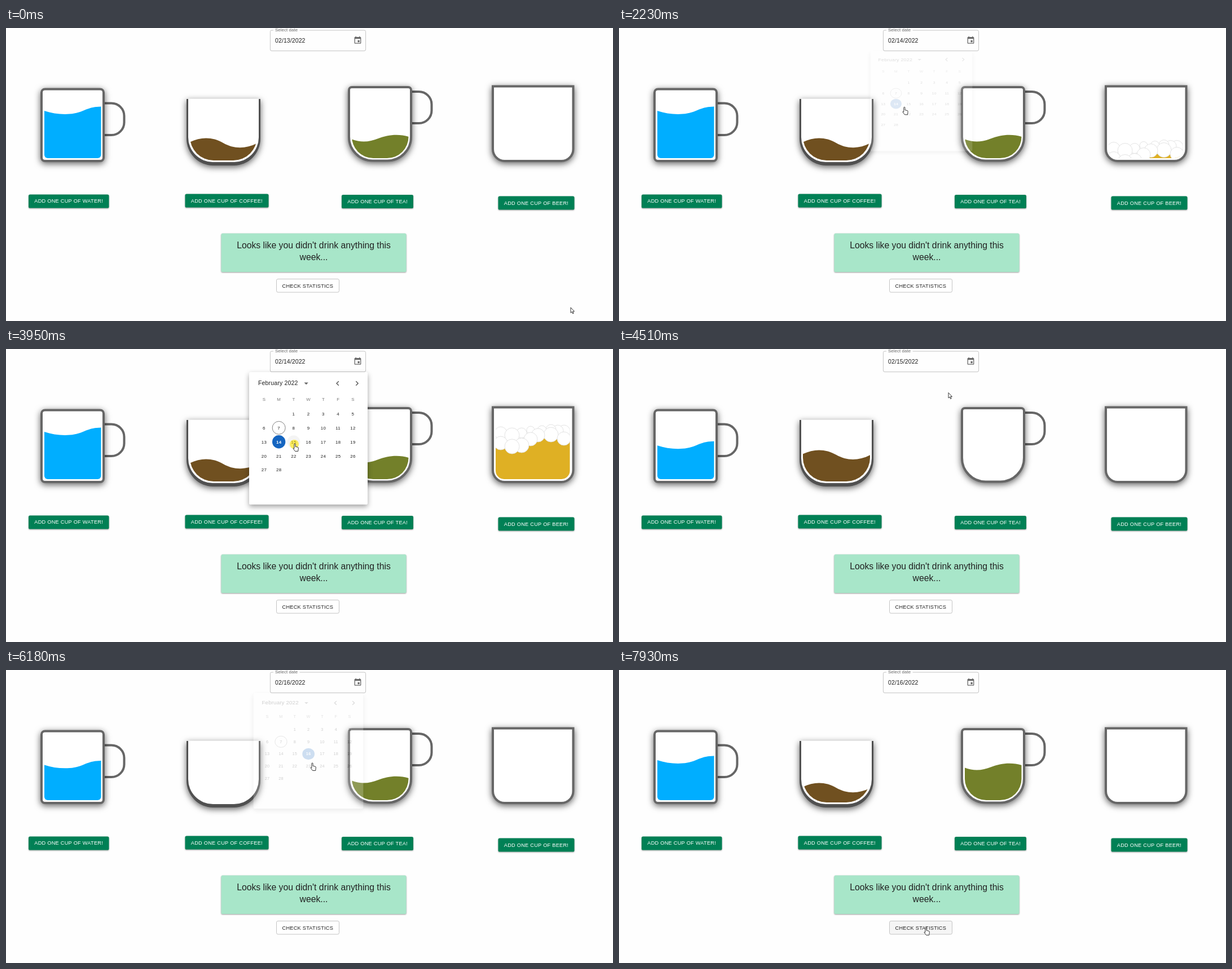
An HTML page for the animation above (7.99 s loop, 1076 px wide and 520 px high).

```html
<!DOCTYPE html>
<html lang="en">
<head>
<meta charset="utf-8">
<title>Drink tracker</title>
<style>
html, body { margin: 0; width: 100%; height: 100%; overflow: hidden; background: #fefefe; }
svg { display: block; width: 1076px; height: 520px; }
text { font: 9.2px "Liberation Sans", Arial, sans-serif; fill: #212121; }
.button rect { fill: #008055; filter: drop-shadow(0 1.5px 1.2px rgba(0,0,0,.38)); }
.button text { fill: #fff; letter-spacing: .263px; }
.body { filter: drop-shadow(0 3px 6px rgba(0,0,0,.62)); }
.glass { fill: #fff; stroke: #666; stroke-width: 4; }
.handle { fill: none; stroke: #666; stroke-width: 4; }
.foam circle { fill: #fff; stroke: #dcdcdc; stroke-width: .8; }
.panel { filter: drop-shadow(0 1px 1.2px rgba(0,0,0,.4)); }
.day { font-size: 7.9px; letter-spacing: .2px; text-anchor: middle; }
.sheet { filter: drop-shadow(0 4px 5px rgba(0,0,0,.36)); }
.cursor { fill: #fff; stroke: #222; stroke-width: .9; stroke-linejoin: round; }
</style>
</head>
<body>
<svg viewBox="0 0 1076 520">
  <defs>
    <clipPath id="waterClip"><path d="M68 112H168.5V225a6 6 0 0 1-6 6H74a6 6 0 0 1-6-6Z"/></clipPath>
    <clipPath id="coffeeClip"><path d="M326 126H445V193A42 42 0 0 1 403 235H368A42 42 0 0 1 326 193Z"/></clipPath>
    <clipPath id="teaClip"><path d="M613 110H713.5V192A38 38 0 0 1 675 231H651A38 38 0 0 1 613 192Z"/></clipPath>
    <clipPath id="beerClip"><path d="M868 108H999.5V216a15 15 0 0 1-15 15H883a15 15 0 0 1-15-15Z"/></clipPath>
  </defs>

  <!-- date field -->
  <path id="field" fill="none" d="M474 4H471a2.6 2.6 0 0 0-2.6 2.6V38a2.6 2.6 0 0 0 2.6 2.6H635a2.6 2.6 0 0 0 2.6-2.6V6.600a2.600 2.600 0 0 0-2.600-2.600H520.500"/>
  <text x="477" y="6" style="font-size:7.9px;letter-spacing:.07px;fill:#666">Select date</text>
  <text id="date" x="477" y="25.800" style="font-size:10.5px;letter-spacing:.1px"></text>
  <circle id="iconHover" cx="623.500" cy="22" r="12.800" fill="#000"/>
  <path fill="#686868" transform="translate(615.600 14) scale(.656)" d="M17 12h-5v5h5zM16 1v2H8V1H6v2H5c-1.100 0-2 .900-2 2v14c0 1.100.900 2 2 2h14c1.100 0 2-.900 2-2V5c0-1.100-.900-2-2-2h-1V1zm3 18H5V8h14z"/>

  <!-- cups -->
  <path class="handle" d="M174 133.500H187A22.500 22.500 0 0 1 209.500 156V167.500A22.500 22.500 0 0 1 187 190H174"/>
  <rect class="glass body" x="63" y="108.500" width="110" height="127.500" rx="6"/>
  <g clip-path="url(#waterClip)"><path id="water" fill="#00aeff" d="M68 147C90 154.500 118 155 135 147.500S158 140 169 139.500V300H68Z"/></g>

  <path class="body" fill="#505050" d="M320 126V196A47 48 0 0 0 367 244H404A47 48 0 0 0 451 196V126Z"/>
  <path fill="#fff" d="M323 125.500V194A44 44 0 0 0 367 238H404A44 44 0 0 0 448 194V125.500Z"/>
  <g clip-path="url(#coffeeClip)"><path id="coffee" fill="#705020" d="M325 203C345 193 366 193 385 204S425 215 446 204V300H325Z"/></g>

  <path class="handle" d="M719 113H732A22.500 22.500 0 0 1 754.500 135.500V146.500A22.500 22.500 0 0 1 732 169H719"/>
  <path class="glass body" d="M613 105H713a5 5 0 0 1 5 5V193A42 42 0 0 1 676 235.500H650A42 42 0 0 1 608 193V110a5 5 0 0 1 5-5Z"/>
  <g clip-path="url(#teaClip)"><path id="tea" fill="#73802a" d="M613 197.500C630 204 645 202 660 196S695 187 714 193V300H613Z"/></g>

  <path class="glass body" d="M863 103.500H1005.500V215a21 21 0 0 1-21 21H884a21 21 0 0 1-21-21Z"/>
  <g clip-path="url(#beerClip)"><g id="beer">
    <path fill="#dfb024" d="M867 187C890 192 915 192 930 182S970 174 1000 180V320H867Z"/>
    <g class="foam" id="foam"></g>
  </g></g>

  <g id="buttons"></g>

  <!-- message and statistics -->
  <rect class="panel" x="381.500" y="364.500" width="328" height="68.500" rx="2.600" fill="#a8e6c9"/>
  <g text-anchor="middle">
    <text x="545.500" y="390.500" style="font-size:15.75px">Looks like you didn't drink anything this</text>
    <text x="545.500" y="411.500" style="font-size:15.75px">week...</text>
  </g>
  <rect id="stats" x="479.500" y="445.500" width="111" height="23.500" rx="2.600" stroke="#c4c4c4"/>
  <text x="489.500" y="460.600" style="letter-spacing:.263px">CHECK STATISTICS</text>

  <!-- calendar -->
  <g id="popup">
    <rect class="sheet" x="431" y="41" width="210" height="235" rx="2.600" fill="#fff"/>
    <text x="447" y="64.300" style="font-size:10.5px;letter-spacing:.17px">February 2022</text>
    <path d="M528.500 59.500H535.800L532.150 63.200Z" fill="#666"/>
    <path d="M589.800 57.200L586 61L589.800 64.800M620.300 57.200L624.100 61L620.300 64.800" fill="none" stroke="#555" stroke-width="1.400"/>
    <circle id="dayHover" r="11.500" fill="#000" fill-opacity=".045"/>
    <circle id="today" r="11.500" fill="none" stroke="#757575" stroke-width=".9"/>
    <circle id="picked" r="11.700" fill="#1565c0"/>
    <g id="days"></g>
  </g>

  <circle id="press" r="8" fill="#ffe600" fill-opacity=".6"/>
  <path class="cursor" id="arrow" d="M0 0V9.500L2.200 7.500 3.700 11 5.200 10.300 3.700 7H6.500Z"/>
  <path class="cursor" id="hand" d="M-1.100 8.500V1.100a1.100 1.100 0 0 1 2.200 0V5.300l4 .900q1.400.400 1.200 1.900l-.600 5.400H.500L-3 8.600q0-1.400 1.900-.1z"/>
</svg>
<script>
const LOOP = 7990;
const $ = id => document.getElementById(id);
const clamp = x => Math.min(1, Math.max(0, x));

function add(parent, tag, attrs, label) {
  const node = document.createElementNS('http://www.w3.org/2000/svg', tag);
  for (const name in attrs) node.setAttribute(name, attrs[name]);
  if (label !== undefined) node.textContent = label;
  return parent.appendChild(node);
}
const set = (id, attrs) => { for (const name in attrs) $(id).setAttribute(name, attrs[name]); };
const show = (id, on) => { $(id).style.display = on ? '' : 'none'; };
const move = (id, x, y) => set(id, { transform: `translate(${x} ${y})` });

// cubic-bezier(.4, 0, .2, 1)
function standard(x) {
  x = clamp(x);
  let low = 0, high = 1;
  for (let i = 0; i < 20; i++) {
    const s = (low + high) / 2, r = 1 - s;
    if (1.2 * r * r * s + .6 * r * s * s + s * s * s < x) low = s; else high = s;
  }
  return low * low * (3 - 2 * low);
}
const easeOut = x => 1 - (1 - clamp(x)) ** 3;

[['WATER', 40, 295.5, 142.5, 310.3], ['COFFEE', 317.5, 294.5, 148, 309.5],
 ['TEA', 595, 296, 127, 310.8], ['BEER', 872.5, 298.5, 135, 313.6]].forEach(([drink, x, y, width, base]) => {
  const g = add($('buttons'), 'g', { class: 'button' });
  add(g, 'rect', { x, y, width, height: 24, rx: 2.6 });
  add(g, 'text', { x: x + 10.3, y: base }, `ADD ONE CUP OF ${drink}!`);
});

[[989, 162, 11], [978, 161, 10], [966, 159, 9], [950, 160, 8], [930, 160, 7], [914, 165, 9],
 [877, 165, 11], [966, 168, 13], [989, 175, 12], [943, 169, 12], [897, 169, 13],
 [930, 176, 12], [877, 183, 12], [914, 187, 13], [897, 189, 13]]
  .forEach(([cx, cy, r]) => add($('foam'), 'circle', { cx, cy, r }));

const column = i => 457.4 + 26.25 * i;
const dayPlace = d => ({ cx: column((d + 1) % 7), cy: 115 + 24.9 * Math.floor((d + 1) / 7) });
[...'SMTWTFS'].forEach((letter, i) =>
  add($('days'), 'text', { x: column(i), y: 91.6, class: 'day', style: 'fill:#777' }, letter));
const dayLabels = Array.from({ length: 28 }, (_, i) => {
  const p = dayPlace(i + 1);
  return add($('days'), 'text', { x: p.cx, y: p.cy + 2.8, class: 'day' }, i + 1);
});
set('today', dayPlace(7));

const TO_14 = 2000, TO_15 = 4000, TO_16 = 5930;
const popups = [[950, 2060], [3190, 4060], [4930, 6030]];
const presses = [910, 1960, 3150, 3910, 4890, 5850];
const track = [[70, 1001, 496], [810, 625, 26], [960, 625, 26], [1490, 549, 162], [1680, 485, 160],
  [2080, 485, 160], [2700, 625, 28], [3220, 625, 28], [3800, 512, 168], [4120, 512, 168],
  [4780, 625, 26], [4940, 625, 26], [5055, 584, 136], [5140, 582, 138], [5550, 543, 165],
  [6900, 543, 165], [7620, 544, 457]];

function cursorAt(t) {
  const i = track.findIndex(k => k[0] > t);
  if (i === 0) return track[0].slice(1);
  if (i < 0) return track[track.length - 1].slice(1);
  const [t0, x0, y0] = track[i - 1], [t1, x1, y1] = track[i];
  const u = (t - t0) / (t1 - t0), e = u * u * (3 - 2 * u);
  return [x0 + (x1 - x0) * e, y0 + (y1 - y0) * e];
}

function popupAt(t) {
  const span = popups.find(([open, close]) => t >= open && t < close + 293);
  if (!span) return { opacity: 0, size: 0, open: false };
  const [open, close] = span;
  return t < close
    ? { opacity: standard((t - open) / 293), size: standard((t - open) / 195), open: true }
    : { opacity: 1 - standard((t - close) / 293), size: 1 - standard((t - close - 98) / 195), open: false };
}

function dayAt([x, y]) {
  const col = Math.round((x - column(0)) / 26.25), row = Math.round((y - 115) / 24.9);
  const day = row * 7 + col - 1;
  return col >= 0 && col < 7 && row >= 0 && day > 0 && day <= 28 ? day : 0;
}

function drawCups(t) {
  const falling = easeOut((t - TO_15) / 1200);
  const rising = easeOut((t - TO_16) / 1200);
  const filling = standard((t - TO_16) / 2000);
  move('water', 0, 30 * falling - 17 * rising);
  move('coffee', 0, t < TO_16 ? -20 * falling : 41 - 36 * filling);
  move('tea', 0, -24 * filling);
  show('tea', t < TO_15 || t >= TO_16);
  move('beer', 0, 51 - 67 * standard((t - TO_14) / 2000));
  show('beer', t >= TO_14 && t < TO_15);
}

function draw(t) {
  const day = 13 + (t >= TO_14) + (t >= TO_15) + (t >= TO_16);
  const [x, y] = cursorAt(t);
  const popup = popupAt(t);

  drawCups(t);
  $('date').textContent = `02/${day}/2022`;

  show('popup', popup.opacity > 0);
  set('popup', {
    opacity: popup.opacity,
    transform: `translate(536 41) scale(${.75 + .25 * popup.size} ${.5625 + .4375 * popup.size}) translate(-536 -41)`
  });
  set('picked', dayPlace(day));
  dayLabels.forEach((label, i) => {
    label.style.fill = i + 1 === day ? '#fff' : '';
    label.style.fontWeight = i + 1 === day ? 'bold' : '';
  });
  const hovered = popup.open ? dayAt(cursorAt(t - 80)) : 0;
  show('dayHover', hovered);
  if (hovered) set('dayHover', dayPlace(hovered));

  const onField = x > 468 && x < 638 && y < 41;
  const onIcon = Math.hypot(x - 623.5, y - 22) < 13;
  const onStats = x > 479 && x < 591 && y > 445 && y < 469;
  const opening = popups.some(([open]) => t >= open && t < open + 300);
  set('field', { stroke: onField && !popup.open ? '#212121' : '#c4c4c4' });
  set('iconHover', { 'fill-opacity': onIcon ? .04 : opening ? .07 : 0 });
  set('stats', { fill: onStats ? '#f5f5f5' : '#fff' });

  const pointing = onIcon || onStats || popup.opacity > 0 && dayAt([x, y]) > 0;
  show('hand', pointing);
  show('arrow', !pointing);
  move('hand', x, y);
  move('arrow', x, y);
  show('press', presses.some(p => t >= p && t < p + 90));
  move('press', x - 1, y + 1);
}

const start = performance.now();
function tick() {
  draw((performance.now() - start) % LOOP);
  requestAnimationFrame(tick);
}
tick();
</script>
</body>
</html>
```
